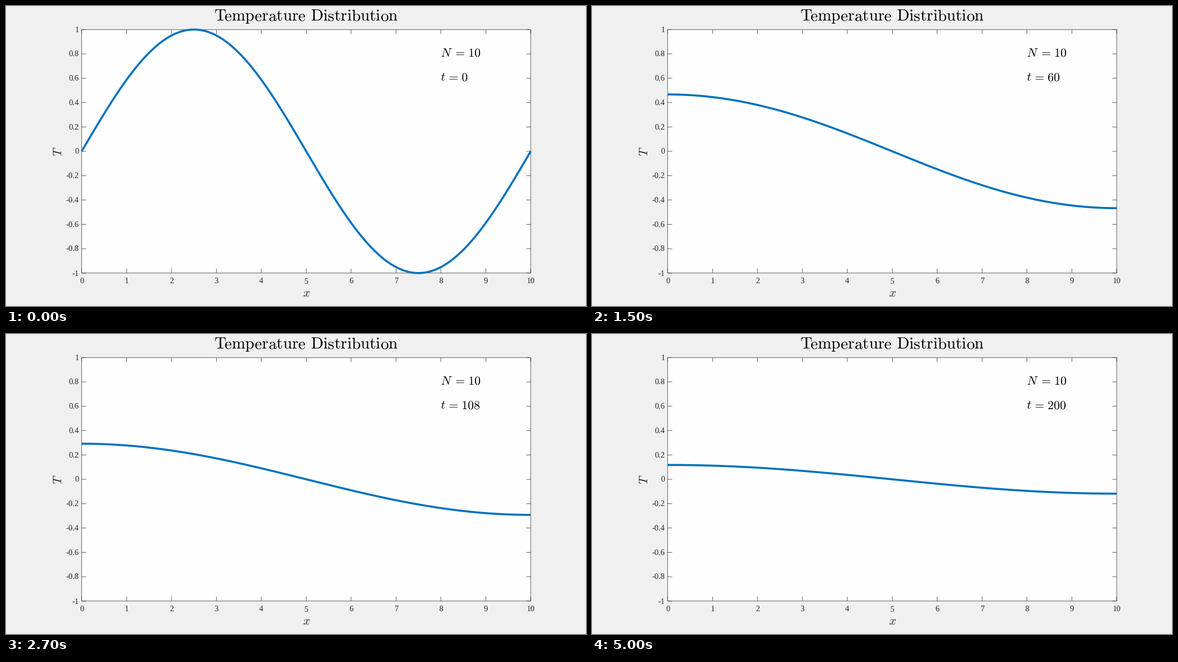
Write a matplotlib script that moves like this. It is 1040 px wide and 539 px high and loops after 5100 ms.

```python
import numpy as np
import matplotlib.pyplot as plt
from matplotlib.animation import FuncAnimation

W, H, DPI = 1040, 539, 100
UNIT = 1.46  # stage pixels per point of the plot's own type scale
LEFT, RIGHT, TOP, BOTTOM = 135.7, 940.9, 42.3, 479.8
FRAMES, INTERVAL, TIME_STEP = 51, 100, 4
LENGTH, DIFFUSIVITY, TERMS = 10, 0.1, 10
INK, BLUE = "#262626", "#0072BD"

plt.rcParams.update({
    "mathtext.fontset": "cm",
    "font.family": "Liberation Serif",
    "text.hinting": "none",
    "axes.unicode_minus": False,
})


def scaled(size):
    return size * UNIT * 72 / DPI


def to_x(x):
    return LEFT + (RIGHT - LEFT) * x / LENGTH


def to_y(temp):
    return (TOP + BOTTOM) / 2 - (BOTTOM - TOP) / 2 * temp


def temperature(x, t):
    """Cosine series for an insulated rod that starts as one sine period."""
    if t == 0:
        return np.sin(2 * np.pi * x / LENGTH)
    total = np.zeros_like(x)
    for n in range(1, TERMS + 1, 2):
        k = n * np.pi / LENGTH
        coef = 8 / (np.pi * (4 - n * n))
        total += coef * np.cos(k * x) * np.exp(-DIFFUSIVITY * k * k * t)
    return total


fig = plt.figure(figsize=(W / DPI, H / DPI), dpi=DPI, facecolor="#F0F0F0")
ax = fig.add_axes([0, 0, 1, 1])
ax.set(xlim=(0, W), ylim=(H, 0))
ax.axis("off")


def label(x, y, text, size, color="black", ha="left", **kw):
    return ax.text(x, y, text, fontsize=scaled(size), color=color, ha=ha,
                   va="baseline", **kw)


def rule(xs, ys):
    ax.plot(xs, ys, color=INK, lw=scaled(0.5), solid_capstyle="butt",
            solid_joinstyle="miter", snap=False, zorder=2)


ax.add_patch(plt.Rectangle((LEFT, TOP), RIGHT - LEFT, BOTTOM - TOP,
                           fc="#FEFEFE", ec="none", zorder=1))
rule([LEFT, RIGHT, RIGHT, LEFT, LEFT], [TOP, TOP, BOTTOM, BOTTOM, TOP])

TICK = 8
for value in range(LENGTH + 1):
    x = to_x(value)
    rule([x, x], [BOTTOM, BOTTOM - TICK])
    rule([x, x], [TOP, TOP + TICK])
    label(x, 498.4, str(value), 10, INK, "center")

for step in range(-5, 6):
    y = to_y(step / 5)
    rule([LEFT, LEFT + TICK], [y, y])
    rule([RIGHT, RIGHT - TICK], [y, y])
    label(131, y + 5, f"{step / 5:g}", 10, INK, "right")

# Explicit kerning around "T" and "p", as TeX sets it.
label(538.5, 26.5,
      r"$\mathrm{T}\hspace{-0.095}\mathrm{emp}\hspace{0.032}\mathrm{erature}"
      r"\hspace{0.38}\mathrm{Distribution}$", 20, ha="center")
label(538.5, 522, "$x$", 15, INK, "center")
label(99.6, 261, "$T$", 15, INK, "center", rotation=90,
      rotation_mode="anchor")
label(779.4, 92, rf"$N\hspace{{0.24}}=\hspace{{0.12}}{TERMS}$", 15)
clock = label(779.4, 136, "", 15)

grid = np.linspace(0, LENGTH, 401)
curve, = ax.plot([], [], color=BLUE, lw=scaled(2.5), solid_capstyle="butt",
                 clip_on=False, zorder=3)


def update(frame):
    t = frame * TIME_STEP
    curve.set_data(to_x(grid), to_y(temperature(grid, t)))
    clock.set_text(rf"$t\hspace{{0.12}}=\hspace{{0.12}}{t}$")
    return curve, clock


anim = FuncAnimation(fig, update, frames=FRAMES, interval=INTERVAL,
                     init_func=lambda: update(0), repeat=True)
plt.show()
```
